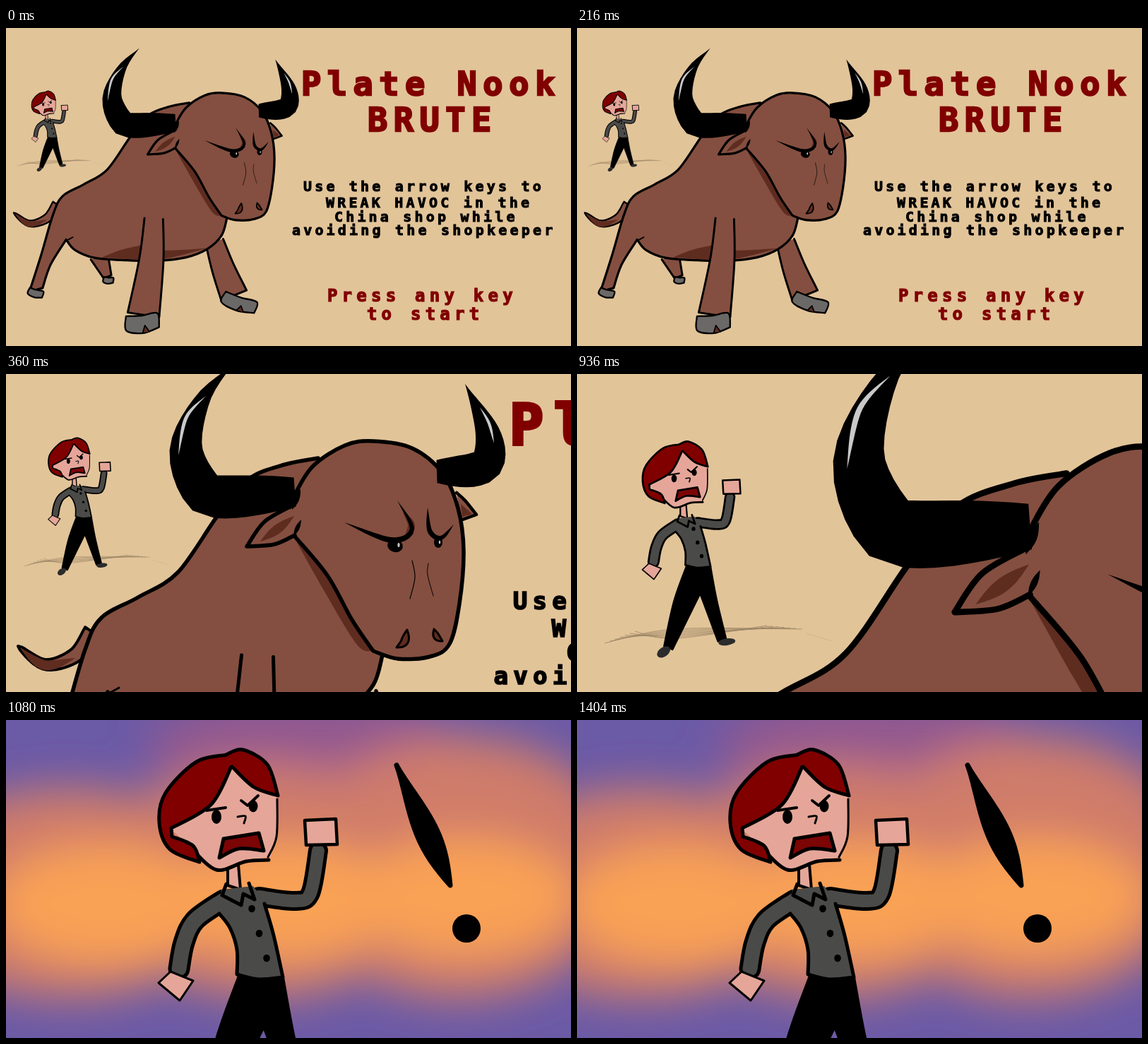
Recreate the animation shown at these times as an HTML page. Size 800 by 450 pixels, loop 1.62 s.

```html
<!DOCTYPE html>
<html lang="en">
<head>
<meta charset="utf-8">
<title>Title screen</title>
<style>
html, body { margin: 0; width: 100%; height: 100%; overflow: hidden; background: #e2c499; }
svg { display: block; width: 100%; height: 100%; }
text { font-family: "DejaVu Sans Mono", monospace; font-weight: bold; white-space: pre; }
path { stroke-linejoin: round; stroke-linecap: round; }
</style>
</head>
<body>
<svg viewBox="0 0 800 450">
  <defs>
    <filter id="soft" x="-30%" y="-30%" width="160%" height="160%"><feGaussianBlur stdDeviation="30"/></filter>
    <g id="keeper"></g>
  </defs>
  <g id="world">
    <use href="#keeper" transform="translate(-15.8 75.7) scale(.3495)"/>
    <g id="bull"></g>
    <g id="words" transform="translate(-1.7 -61.9) scale(1.709)"></g>
  </g>
  <g id="closeup">
    <rect width="800" height="450" fill="#6b5aa6"/>
    <g id="sky" filter="url(#soft)"></g>
    <use href="#keeper"/>
    <g id="bang"></g>
  </g>
</svg>
<script>
const $ = id => document.getElementById(id);
const HIDE = '#844f40', SHADE = '#5f2c20', HOOF = '#6b6967', SKIN = '#e5a699',
      SHIRT = '#4a4a48', INK = '#000', RED = '#800000', SHINE = '#c9c9c9';
let layer;

function add(tag, attrs, content) {
  const el = document.createElementNS('http://www.w3.org/2000/svg', tag);
  for (const k in attrs) el.setAttribute(k, attrs[k]);
  if (content) el.textContent = content;
  layer.append(el);
  return el;
}

// Smooth path through points; "|" marks a corner.
function curve(spec) {
  let d = '', last;
  for (const part of spec.split('|')) {
    const n = part.trim().split(/\s+/).map(Number);
    const p = last ? [last] : [];
    for (let i = 0; i < n.length; i += 2) p.push([n[i], n[i + 1]]);
    if (!last) d = 'M' + p[0];
    for (let i = 0; i < p.length - 1; i++) {
      const b = p[i], c = p[i + 1], a = p[i - 1] || b, e = p[i + 2] || c;
      const h1 = b.map((v, k) => v + (c[k] - a[k]) / 6);
      const h2 = c.map((v, k) => v - (e[k] - b[k]) / 6);
      d += `C${h1} ${h2} ${c}`;
    }
    last = p[p.length - 1];
  }
  return d;
}

const path = (d, fill, width = 0, stroke = INK) =>
  add('path', { d, fill, stroke: width ? stroke : 'none', 'stroke-width': width });
const shape = (spec, ...paint) => path(curve(spec), ...paint);
const line = (spec, width, stroke) => shape(spec, 'none', width, stroke);
const oval = (cx, cy, rx, ry, fill, turn = 0) =>
  add('ellipse', { cx, cy, rx, ry, fill, transform: `rotate(${turn} ${cx} ${cy})` });

// Ribbon along a spine whose width is a function of the way travelled (0..1).
function ribbon(spec, width, ...paint) {
  const spine = line(spec), len = spine.getTotalLength(), left = [], right = [];
  for (let i = 0; i <= 24; i++) {
    const s = len * i / 24, w = width(i / 24) / 2;
    const p = spine.getPointAtLength(s), a = spine.getPointAtLength(s - 1), b = spine.getPointAtLength(s + 1);
    const turn = Math.atan2(b.y - a.y, b.x - a.x), dx = w * Math.sin(turn), dy = w * Math.cos(turn);
    left.push([p.x + dx, p.y - dy]);
    right.unshift([p.x - dx, p.y + dy]);
  }
  spine.remove();
  path('M' + left.concat(right).join('L'), ...paint);
}

const swell = w => t => w * Math.sin(Math.PI * t);
const hornWidth = w => t => w * Math.sin(2.4 * t ** 1.15);

function hoof(x, y, w, h, turn, toe) {
  const g = `translate(${x} ${y}) rotate(${turn})`;
  const at = (px, py) => `${px * w / 2} ${py * h / 2}`;
  shape([at(-.95, -.8), at(-1, .7), at(0, 1.1), at(1, .6) + '|' + at(.95, -.9), at(0, -.75), at(-.95, -.8)].join(' '),
    HOOF, 4).setAttribute('transform', g);
  if (toe) shape(`${at(0, 1)}|${at(.15, .3)}|${at(.4, 1)}`, SHADE, 3).setAttribute('transform', g);
}

const leg = (spec, top, bottom) => ribbon(spec, t => top + (bottom - top) * t, HIDE, 5);

function drawBull() {
  layer = $('bull');
  const tail = '17 385 55 411 98 398 122 365';
  ribbon(tail, t => 24 * Math.sqrt(t), HIDE, 4);
  ribbon('20 388 55 412 98 402', swell(14), SHADE);
  leg('224 490 244 540', 44, 20);
  hoof(246, 548, 24, 16, 8);
  leg('503 455 524 520 550 585', 44, 66);
  hoof(563, 603, 84, 36, 20, true);

  shape('442 119 395 128 343 149 300 200 243 281 187 316 135 345 112 390 84 485 55 576|87 567|106 511 144 450|165 475 212 494 289 500 366 501 434 493 485 473 520 440 533 398', HIDE, 5.5);
  line('142 454|160 444', 3);
  shape('230 493 280 474 345 460|372 476 485 471|366 498 230 493', SHADE);
  hoof(70, 579, 36, 20, 18);
  leg('356 399 350 500 331 632', 45, 77);
  hoof(328, 651, 80, 46, -4, true);

  shape('410 235 450 306 497 383 520 392|460 290 410 235', SHADE);
  shape('638 168 650 179 666 199|644 207', HIDE, 4.5);
  shape('644 184 660 198|646 202', SHADE);
  // head
  shape('408 185 409 171 435 130 480 101 520 95 575 105 618 140 640 190 648 250 642 325 628 382 600 400 555 403 520 392|490 348 455 285 409 230', HIDE, 5.5);

  ribbon('650 14 681 80 683 122 660 136 610 138', hornWidth(48), INK);
  ribbon('671 47 684 70 691 98', swell(4), SHINE);
  ribbon('321 -13 279 35 255 105 277 163 308 174 409 167', hornWidth(61), INK);
  ribbon('283 31 255 62 244 115', swell(5), SHINE);
  // ear
  shape('408 185 366 209 341 244|380 241 409 228', HIDE, 5.5);
  ribbon('360 237 385 219 408 201', swell(13), SHADE);
  ribbon('417 163 405 192', swell(8), INK);
  ribbon('407 230 418 206', swell(6), INK);
  // brows, eyes, nostrils
  ribbon('562 195 574 215 562 237', swell(10), SHADE);
  ribbon('479 210 545 235 575 220 554 179', swell(8), INK);
  ribbon('597 189 600 222 616 232 634 213', swell(7), INK);
  oval(551, 243, 11, 9, INK, 15);
  oval(556, 242, 1.6, 3, SHINE);
  oval(612, 238, 6, 8, INK);
  oval(614, 238, 1.2, 2.6, SHINE);
  line('575 264 579 288 572 318', 1.2);
  line('598 268 597 284 605 314', 1);
  ribbon('553 387 564 379 568 362', swell(10), SHADE, 3);
  ribbon('606 361 610 372 618 378', swell(8), SHADE, 3);
}

function limb(spec, w) {
  line(spec, w + 5, INK);
  line(spec, w - 5, SHIRT);
}

function drawKeeper() {
  layer = $('keeper');
  // ground scribble
  for (let i = 0; i < 7; i++)
    line(`${120 + i * 13} ${561 - i * 5} 300 ${525 + i * 4} ${627 - i * 15} ${525 - i * 1.5}`, 1.5, '#9a8465');
  line('640 537 702 555', 1, '#c1a782');

  shape('330 362|297 455 272 569|294 578|365 434|411 557|432 549|408 450 392 364', INK, 4);
  oval(271, 584, 19, 12, '#2c2c2c', -35);
  oval(434, 558, 22, 9, '#2c2c2c', -8);
  shape('314 205|314 234|332 240|329 205', SKIN, 4);
  limb('308 255 268 283 252 315 245 352', 26);
  limb('358 250 410 256 431 245 442 185', 23);
  shape('305 240|350 235|366 260 379 305 392 364|358 367 327 360|326 322 316 292 300 272', SHIRT);
  line('302 274 317 294 327 325 327 360|358 367 392 364|379 305 366 260', 5);
  line('312 232|306 248|333 262|336 246|352 254|344 231', 5);
  for (let i = 0; i < 3; i++) oval(348 + i * 10.5, 267 + i * 35, 4.8, 5.2, INK);
  shape('233 356|265 369|246 397|216 372|233 356', SKIN, 3);
  shape('423 142|467 140|469 176|425 177|423 142', SKIN, 4.5);
  // head
  shape('318 62|385 105|384 150 375 194|340 200 300 212 262 180 234 155', SKIN);
  line('262 181 298 212 340 200 372 198', 5);
  line('384 112 383 165 371 194', 3);
  shape('316 49 270 59 226 103 217 145 232 183 274 201|265 178 235 165|234 153|290 120 319 66', RED, 5);
  shape('312 49 335 42 370 63 385 107|351 95 320 66', RED, 5);
  line('284 128 311 124', 4);
  line('333 114|342 121|357 107', 4);
  oval(298, 137, 7, 10, INK);
  oval(350, 122, 6.5, 8.5, INK);
  line('328 137 339 136 337 146', 3);
  shape('308 168 358 160|365 185|330 182 302 195|308 168', '#7c0505', 5);
}

function drawWords() {
  layer = $('words');
  const block = (fill, size, pitch, ...lines) => lines.forEach(([x, y, str]) => add('text', {
    x, y, fill, 'font-size': size, 'letter-spacing': pitch - .602 * size,
    stroke: fill, 'stroke-width': size * .05
  }, str));
  block(RED, 47, 36.8, [418, 95, 'Plate Nook'], [512, 146, 'BRUTE']);
  block(INK, 20, 16.25, [421, 231, 'Use the arrow keys to'], [453, 254, 'WREAK HAVOC in the'],
    [465, 274, 'China shop while'], [405, 293, 'avoiding the shopkeeper']);
  block(RED, 24, 20.7, [455, 387, 'Press any key'], [511, 413, 'to start']);
}

function drawCloseup() {
  layer = $('sky');
  oval(420, 40, 220, 80, '#92598f');
  for (let i = 0; i < 3; i++) oval(90 + i * 275, 245 - i * 18, 240, 150 + i * 18, '#cf7b6b');
  for (let i = 0; i < 3; i++) oval(140 + i * 255, 260 - i * 5, 160, 85, '#f9a154');
  layer = $('bang');
  ribbon('553 64 603 175 629 234', t => 29 * Math.sin(Math.PI * t ** 1.3), INK, 7);
  oval(652, 295, 20, 20, INK);
}

// Camera cuts: [end in ms, x, y, zoom]; the last one is the close-up.
const cuts = [[360, 1, 36.2, .585], [720, 0, 0, 1], [1080, -1.4, -46.5, 1.572], [1620]];

function render(ms) {
  const [, x, y, zoom] = cuts.find(([end]) => ms % 1620 < end);
  $('world').style.display = zoom ? '' : 'none';
  $('closeup').style.display = zoom ? 'none' : '';
  if (zoom) $('world').setAttribute('transform', `translate(${x} ${y}) scale(${zoom})`);
}

drawBull();
drawKeeper();
drawWords();
drawCloseup();

function tick() {
  render(performance.now());
  requestAnimationFrame(tick);
}
tick();
</script>
</body>
</html>
```
